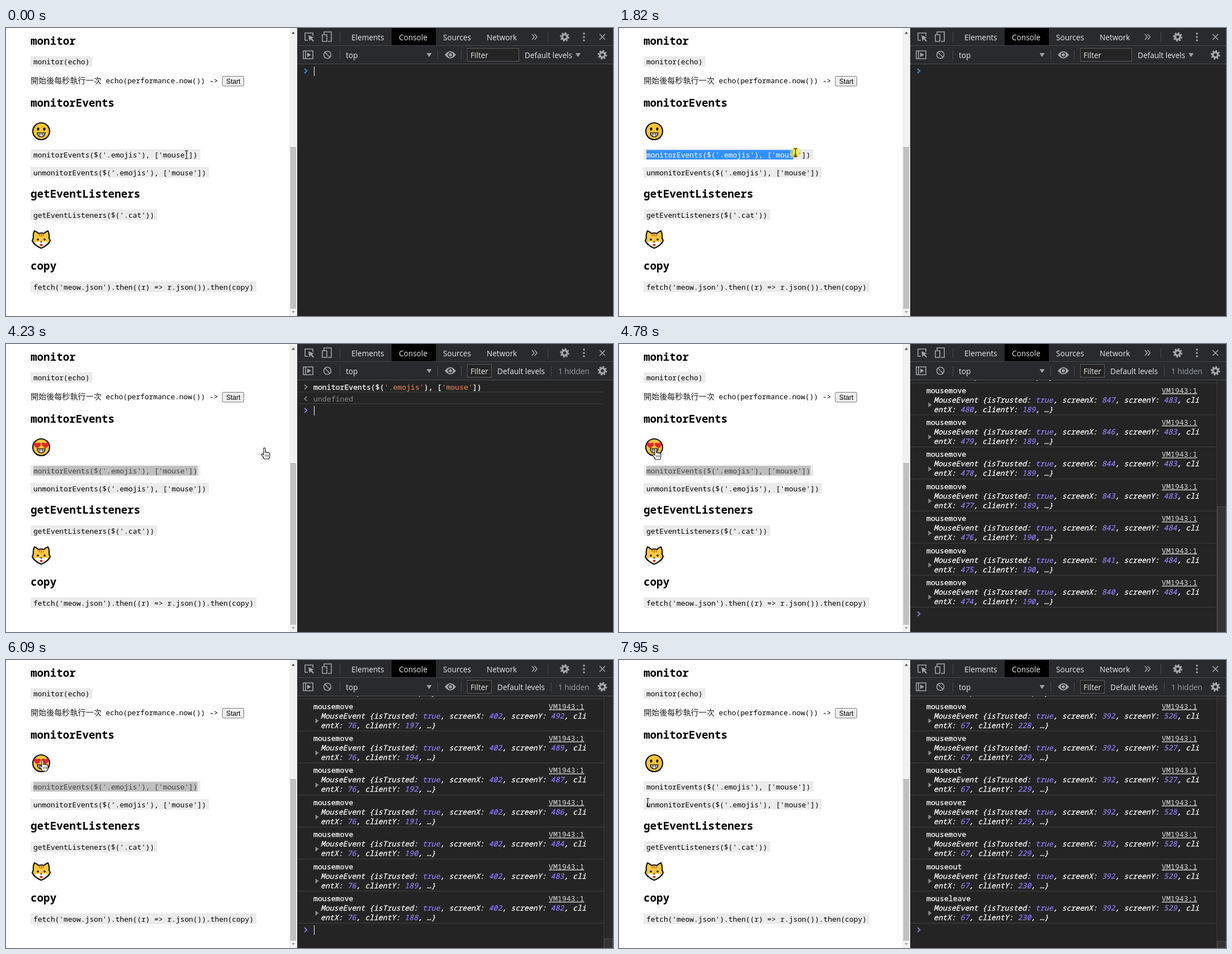
An HTML page that plays this animation: 1086x516 px, repeating every 8000 ms.

```html
<!DOCTYPE html>
<html lang="zh-Hant">
<head>
<meta charset="utf-8">
<style>
html, body { margin: 0; width: 100%; height: 100%; overflow: hidden; background: #fff; }
svg { display: block; }
text { white-space: pre; }
.code { font: 12.88px "Noto Sans Mono", monospace; fill: #000; }
.head { font: bold 19.25px "Noto Sans Mono", monospace; fill: #000; }
.cjk { font: 14.1px "Noto Sans CJK TC", "Noto Sans CJK", sans-serif; fill: #222; }
.btn { font: 12px "Liberation Sans", sans-serif; fill: #000; }
.ui { font: 13.6px "Open Sans", sans-serif; fill: #e8eaed; }
.dim { fill: #9aa0a6; }
.log { font: 13.2px "Noto Sans Mono", monospace; fill: #f4f4f4; stroke: #f4f4f4; stroke-width: .35; }
.obj { font-style: italic; }
.num { fill: #9980ff; stroke: #9980ff; stroke-width: .2; }
.str { fill: #f28b54; stroke: none; }
.gray { fill: #8a8a8a; stroke: none; }
.link { text-decoration: underline; fill: #ddd; stroke: none; }
.icon { fill: none; stroke: #a2a5a8; stroke-width: 1.6; }
.solid { fill: #a2a5a8; }
</style>
</head>
<body>
<svg id="stage" width="1086" height="516" viewBox="0 0 1086 516"></svg>
<script>
const LOOP = 8000, TICK = 70, ROW = 57.4, CHAR = 7.725;
const COMMAND = "monitorEvents($('.emojis'), ['mouse'])";
const DRAG = 1280, RELEASE = 2050, FOCUS = 2970, PASTE = 3290, ENTER = 3850, CLICK = 6320, CLICK_END = 7000;

// [time, x, y]
const pointerPath = [
  [0, 323, 227], [900, 48, 237], [1300, 50, 229], [2000, 368, 222], [2250, 368, 222],
  [2820, 585, 83], [ENTER, 585, 83], [4160, 468, 187], [4760, 66, 188], [5300, 56, 194],
  [5740, 66, 180], [7260, 66, 180], [7800, 51.5, 255]];
// [time, number of logged events]
const logCount = [
  [4160, 0], [4630, 15], [4850, 15], [6090, 205], [6700, 249], [6850, 249], [7000, 252], [7260, 252], [7800, 288]];
// [event index, screenX, screenY]
const mousePath = [
  [0, 855.95, 479.86], [14, 839.85, 484.48], [150, 392, 499], [198, 402, 491.9], [200, 402, 486.9],
  [204, 402, 482], [228, 400, 499], [252, 400, 499], [281, 392, 526], [287, 392, 529]];

const linear = p => p, smooth = p => p * p * (3 - 2 * p);

function at(keys, t, ease) {
  const i = keys.findIndex(k => k[0] > t);
  if (i < 1) return (i ? keys[keys.length - 1] : keys[0]).slice(1);
  const a = keys[i - 1], b = keys[i], p = ease((t - a[0]) / (b[0] - a[0]));
  return a.slice(1).map((v, j) => v + (b[j + 1] - v) * p);
}

const text = (x, y, cls, s) => `<text x="${x}" y="${y}" class="${cls}">${s}</text>`;
const rect = (x, y, w, h, fill, extra = '') =>
  `<rect x="${x}" y="${y}" width="${w}" height="${h}" fill="${fill}" ${extra}/>`;
const path = (d, attrs) => `<path d="${d}" ${attrs}/>`;
const icon = d => path(d, 'class="icon"');
const solid = d => path(d, 'class="solid"');
const span = (cls, s) => `<tspan class="${cls}">${s}</tspan>`;
const codeBox = (y, s) => rect(44, y, s.length * CHAR + 10, 19, '#ebebeb') + text(49, y + 14.5, 'code', s);
const gear = (x, y) => `<g class="icon" transform="translate(${x} ${y})">
  <circle r="4.6" stroke-width="3.6"/><circle r="7" stroke-width="2.8" stroke-dasharray="2.75"/></g>`;
const separator = (x, y) => rect(x, y, 1, 17, '#4a4c50');
const rule = y => rect(522, y, 547, 1, '#404040');
const chevron = (y, color) =>
  path(`M534 ${y - 4}l4.5 4-4.5 4`, `fill="none" stroke="${color}" stroke-width="1.8"`);

const cat = path('M51 363.5Q55 365 58 368Q63 366.500 68 368Q71 365 75 363.500Q78 369 77 376L79 381Q76 389 63 394.500Q50 389 47 381L49 376Q48 369 51 363.500Z',
    'fill="#fdc740" stroke="#111" stroke-width="2.2" stroke-linejoin="round"')
  + path('M59.500 369v4M63 368v6M66.500 369v4', 'stroke="#b06a1c" stroke-width="1.5"')
  + path('M51 384q6-2 12 0q6-2 12 0q-4 6-12 9q-8-3-12-9z', 'fill="#fff"')
  + '<circle cx="57" cy="379" r="1.8"/><circle cx="69" cy="379" r="1.8"/>'
  + path('M61 382.500h4l-2 2.500z', 'fill="#111"')
  + path('M60.500 387h5v2q-2.500 4-5 0z', 'fill="#e02a20"');

const page = rect(0, 0, 521, 516, '#fff')
  + text(44, 30, 'head', 'monitor') + text(44, 141, 'head', 'monitorEvents')
  + text(44, 303.5, 'head', 'getEventListeners') + text(44, 433, 'head', 'copy')
  + codeBox(50.5, 'monitor(echo)') + codeBox(249, 'un' + COMMAND)
  + codeBox(325, "getEventListeners($('.cat'))")
  + codeBox(454, "fetch('meow.json').then((r) => r.json()).then(copy)")
  + text(44, 99, 'cjk', '開始後每秒執行一次') + text(178.5, 99, 'code', 'echo(performance.now()) ->')
  + rect(387, 86.5, 38.5, 17.5, '#efefef', 'stroke="#767676" rx="2"') + text(394, 99.5, 'btn', 'Start')
  + cat
  + rect(507, 0, 14, 516, '#f1f1f1') + rect(508.5, 213, 10.5, 290, '#c1c1c1')
  + path('M511 10.5l3-4 3 4z', 'fill="#505050"') + path('M511 507l3 4 3-4z', 'fill="#a3a3a3"');

const toolbar = rect(521, 0, 565, 65, '#292a2d') + rect(521, 31, 565, 1, '#45474b')
  + rect(521, 64, 565, 1, '#494c50') + rect(690, 0, 79, 31, '#000')
  + text(618, 21.5, 'ui', 'Elements') + text(703, 21.5, 'ui', 'Console')
  + text(782, 21.5, 'ui', 'Sources') + text(860, 21.5, 'ui', 'Network')
  + icon('M549 14v-5h-14v13h5') + solid('M541 13l10 4-4 1.5 4 4.5-1.5 1.5-4.5-4.5-2 4z')
  + icon('M569 11v-4h13v17h-6M566 12h8v12h-8z') + icon('M941 11l4 5-4 5M946 11l4 5-4 5')
  + gear(999.5, 16) + gear(1067, 48)
  + [10, 16, 22].map(y => `<circle cx="1034" cy="${y}" r="1.8" class="solid"/>`).join('')
  + icon('M1062 11l10 10M1072 11l-10 10')
  + icon('M532 41h17v14h-17zM536 41v14') + solid('M539 44l7 4-7 4z')
  + icon('M568.5 48a6.5 6.5 0 1 0 13 0a6.5 6.5 0 1 0-13 0M570.5 43.5l9 9')
  + text(608, 53.5, 'ui', 'top') + solid('M752.5 45h9l-4.5 7z')
  + solid('M785 48q10-13 20 0q-10 13-20 0z')
  + '<circle cx="795" cy="48" r="3.7" fill="#a2a5a8" stroke="#292a2d" stroke-width="1.8"/>'
  + separator(597, 8) + separator(969, 8) + separator(597, 40) + separator(772, 40) + separator(814, 40);

function filterBar(narrow) {
  return rect(825.5, 36.5, narrow ? 43 : 92, 23, '#242424', 'stroke="#5c5c5c"')
    + text(831, 53.5, 'ui', 'Filter') + text(narrow ? 879 : 928, 53.5, 'ui', 'Default levels')
    + (narrow ? separator(975, 40) + text(988, 53.5, 'ui dim', '1 hidden') : solid('M1019 45h9l-4.5 7z'));
}

function face(inLove) {
  const heart = x => path(`M${x} 187c-10-6-7-13 0-9c7-4 10 3 0 9z`, 'fill="#e8252b"');
  const eye = x => `<ellipse cx="${x}" cy="181" rx="2" ry="2.8"/>`;
  return '<circle cx="63" cy="185" r="15" fill="#fdc53a" stroke="#111" stroke-width="2.2"/>'
    + (inLove ? heart(56) + heart(70.5) : eye(57.5) + eye(68.5))
    + path('M56 188h14q-1 7-7 7t-7-7z', 'fill="#fff" stroke="#111" stroke-width="1.6"')
    + path('M57 191h12M60.500 188v6M65.500 188v6', 'stroke="#111" stroke-width=".7"');
}

function commandRow(t) {
  const focused = t < FOCUS, selected = t >= DRAG && t < CLICK;
  const dragX = at(pointerPath, Math.min(t, RELEASE), smooth)[0];
  const count = selected ? Math.max(0, Math.min(COMMAND.length, Math.floor((dragX - 49) / CHAR))) : 0;
  return codeBox(217, COMMAND)
    + rect(49, 218.5, count * CHAR, 17, focused ? '#3390ff' : '#bfbfbf')
    + `<text x="49" y="231.5" class="code" style="fill:${focused ? '#fff' : '#444'}">${COMMAND.slice(0, count)}</text>`;
}

const clicking = ['mousedown', 'mouseup', 'click'];
const leaving = ['mouseout', 'mouseover', 'mousemove', 'mouseout', 'mouseleave'];

function eventName(k) {
  if (k < 2) return ['mouseover', 'mouseenter'][k];
  if (k >= 231 && k < 252) return clicking[k % 3];
  return leaving[k - 283] || 'mousemove';
}

function message(k, bottom) {
  const [sx, sy] = at(mousePath, k, linear).map(Math.round);
  // Page coordinates are the screen ones, shifted and zoomed.
  const cx = Math.round(76.2 + (sx - 402) * .908), cy = Math.round(188.6 + (sy - 483) * .908);
  const num = v => span('num', v);
  return text(550, bottom - 39.5, 'log', eventName(k)) + text(971, bottom - 39.5, 'log link', 'VM1943:1')
    + text(563, bottom - 22.5, 'log obj', `MouseEvent {isTrusted: ${num('true')}, screenX: ${num(sx)}, screenY: ${num(sy)}, cli`)
    + text(563, bottom - 5.5, 'log obj', `entX: ${num(cx)}, clientY: ${num(cy)}, …}`)
    + path(`M553.5 ${bottom - 22.5}l6 4.5-6 4.5z`, 'fill="#8a8a8a"')
    + rule(bottom - .5);
}

const styledCommand = COMMAND.replace(/'[^']+'/g, s => span('str', s));

function echo(top) {
  return chevron(top + 12, '#8a8a8a') + text(550, top + 16.5, 'log', styledCommand) + rule(top + 20.5)
    + path(`M538.5 ${top + 29}l-4.5 4 4.5 4`, 'fill="none" stroke="#8a8a8a" stroke-width="1.6"')
    + text(550, top + 37.5, 'log gray', 'undefined') + rule(top + 41.5);
}

function scrollbar(thumb) {
  return rect(1069, 65, 17, 451, '#292929') + rect(1069, 65, 1, 451, '#3a3a3a')
    + rect(1070.5, 516.5 - thumb, 15, thumb, '#333', 'stroke="#4c4c4c"');
}

function consolePane(t) {
  const n = Math.floor(at(logCount, t, smooth)[0] + 1e-6);
  const entered = t >= ENTER, pasted = t >= PASTE && !entered;
  const bottom = entered ? Math.min(107 + n * ROW, 471.5) : 65;
  let out = rect(521, 65, 565, 451, '#242424');
  if (entered) {
    out += echo(bottom - n * ROW - 42);
    for (let k = Math.max(0, n - 8); k < n; k++) out += message(k, bottom - (n - 1 - k) * ROW);
    const thumb = 451 * 451 / (n * ROW + 43);
    if (thumb < 451) out += scrollbar(thumb);
  }
  out += chevron(bottom + 12, entered ? '#9277f0' : '#3794e0');
  if (pasted) out += text(550, 81.5, 'log', styledCommand) + rect(653.5, 85, 8, 1, '#ddd') + rect(844, 85, 8, 1, '#ddd');
  const focused = t < DRAG || t >= FOCUS && t < CLICK;
  if (focused && (pasted || (t + 140) % 1000 < 500)) out += rect(pasted ? 851 : 551, bottom + 4, 1, 17, '#fff');
  return out;
}

function pointer(t, x, y, hover) {
  const dark = x > 521, beam = dark ? y > 65 : y > 216 && x < 505;
  const pressed = t >= DRAG && t < RELEASE || t >= CLICK && t < CLICK_END && t % 210 < 140;
  const shape = hover
    ? path('M-2 0q2-2 3 0v7q2-1 3 .5q2-1 2.5 .5q2.5-.5 2.5 2v4q0 3-2 5h-8q-1-4-5-7.5q0-2.5 2.5-1.5l1.5 1.5z',
        'fill="#fff" stroke="#111" stroke-width="1.1"') + path('M1.5 11v4M4 11v4M6.5 11v4', 'stroke="#111" stroke-width=".8"')
    : beam
      ? path('M-3-7h2.5l.5 1 .5-1h2.5M0-6v12M-3 7h2.5l.5-1 .5 1h2.5', `fill="none" stroke="${dark ? '#eee' : '#111'}" stroke-width="1.1"`)
      : path('M0 0v14l3.3-3 2.2 5 2.2-1-2.2-4.8h4.5z', 'fill="#fff" stroke="#111"');
  return `<g transform="translate(${x} ${y})">
    ${pressed ? '<circle r="9.5" fill="#f8e71c" opacity=".65"/>' : ''}${shape}</g>`;
}

function render(t) {
  const [x, y] = at(pointerPath, t, smooth);
  const hover = t >= ENTER && x < 470 && y > 168 && y < 212;
  stage.innerHTML = page + face(hover) + commandRow(t) + consolePane(t)
    + toolbar + filterBar(t >= ENTER) + pointer(t, x, y, hover);
}

const stage = document.getElementById('stage');
let shown = -1;
function frame() {
  const t = performance.now() % LOOP, sample = t - t % TICK;
  // Rounding removes the float residue of the modulo.
  if (Math.round(sample) !== shown) render(shown = Math.round(sample));
  requestAnimationFrame(frame);
}
frame();
</script>
</body>
</html>
```
